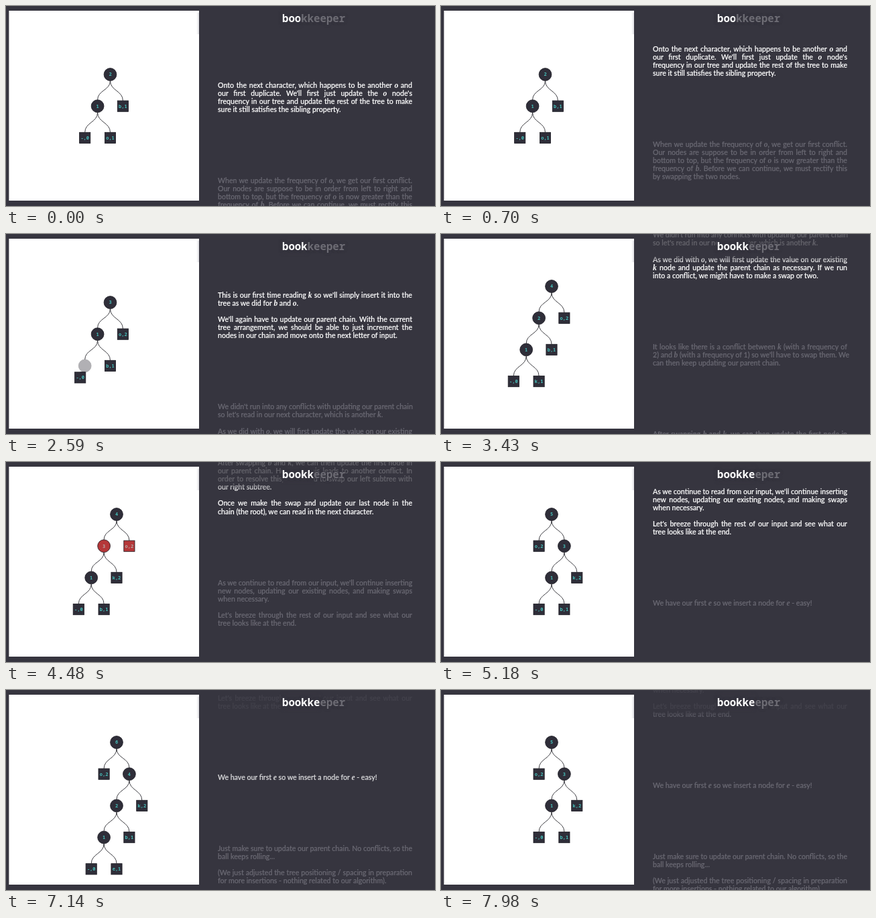
Write an HTML page that moves like this. It is 640x298 px and loops after 8 s.

```html
<!DOCTYPE html>
<html lang="en">
<head>
<meta charset="utf-8">
<title>Adaptive Huffman tree</title>
<style>
  html, body { margin: 0; width: 100%; height: 100%; overflow: hidden; background: #36353f; }
  #stage { position: relative; width: 640px; height: 298px; overflow: hidden; background: #36353f; }
  #tree { position: absolute; left: 0; top: 0; }
  #tree text { font: 700 7px "Noto Sans Mono", "DejaVu Sans Mono", monospace; text-anchor: middle; }
  #prose { position: absolute; left: 316px; top: 0; width: 290px; font: 500 10.6px/12px Lato, "Open Sans", sans-serif;
    -webkit-text-stroke: .2px currentColor; }
  .line { position: absolute; left: 0; width: 290px; height: 12px; white-space: nowrap; }
  .full { text-align: justify; text-align-last: justify; }
  .line i { font: italic 700 11.5px/0 "Liberation Serif", "Noto Serif", serif; -webkit-text-stroke: 0; }
  #veil { position: absolute; left: 292px; top: 0; width: 348px; height: 43px;
    background: linear-gradient(rgba(54,53,63,.77) 31px, rgba(54,53,63,0) 43px); }
  #title { position: absolute; left: 412px; top: 8px; font: 600 15.7px/20px "Noto Sans Mono", "DejaVu Sans Mono", monospace;
    color: #6d6c74; white-space: pre; text-shadow: 0 0 4px #36353f, 0 0 4px #36353f; }
  #title b { font-weight: 600; color: #fff; background: #36353f; box-shadow: 0 0 4px #36353f; }
</style>
</head>
<body>
<div id="stage">
  <svg id="tree" width="292" height="298" viewBox="0 0 292 298">
    <defs>
      <linearGradient id="edge"><stop offset="0" stop-color="#fff"/><stop offset="1" stop-color="#e0e0e4"/></linearGradient>
    </defs>
    <rect x="4.4" y="7" width="283.6" height="283" fill="#fff"/>
    <rect x="284" y="10" width="4" height="32" fill="url(#edge)"/>
    <g id="graph"></g>
  </svg>
  <div id="prose"></div>
  <div id="veil"></div>
  <div id="title"></div>
</div>
<script>
const LOOP = 8000;
const $ = id => document.getElementById(id);
const clamp = v => Math.max(0, Math.min(1, v));
const mix = (a, b, u) => a + (b - a) * u;
const ease = u => u < .5 ? 4 * u ** 3 : 1 - (2 - 2 * u) ** 3 / 2;
const mixColor = (a, b, u) => `rgb(${a.map((v, i) => Math.round(mix(v, b[i], u)))})`;

// Sections of paragraphs; "|" breaks lines, _x_ marks a symbol.
const sections = [
  ["Onto the next character, which happens to be another _o_ and|our first duplicate. We'll first just update the _o_ node's|frequency in our tree and update the rest of the tree to make|sure it still satisfies the sibling property."],
  ["When we update the frequency of _o_, we get our first conflict.|Our nodes are suppose to be in order from left to right and|bottom to top, but the frequency of _o_ is now greater than the|frequency of _b_. Before we can continue, we must rectify this|by swapping the two nodes."],
  ["Now that we've swapped the two nodes, our tree again|satisfies the sibling property, so we can continue updating the|rest of the tree. In this case, we simply had to update the root's|value, so we are good to go.",
   "Time for the next character..."],
  ["This is our first time reading _k_ so we'll simply insert it into the|tree as we did for _b_ and _o_.",
   "We'll again have to update our parent chain. With the current|tree arrangement, we should be able to just increment the|nodes in our chain and move onto the next letter of input."],
  ["We didn't run into any conflicts with updating our parent chain|so let's read in our next character, which is another _k_.",
   "As we did with _o_, we will first update the value on our existing|_k_ node and update the parent chain as necessary. If we run|into a conflict, we might have to make a swap or two."],
  ["It looks like there is a conflict between _k_ (with a frequency of|2) and _b_ (with a frequency of 1) so we'll have to swap them. We|can then keep updating our parent chain."],
  ["After swapping _b_ and _k_, we can then update the first node in|our parent chain. However, this leads to another conflict. In|order to resolve this, we'll need to swap our left subtree with|our right subtree.",
   "Once we make the swap and update our last node in the|chain (the root), we can read in the next character."],
  ["As we continue to read from our input, we'll continue inserting|new nodes, updating our existing nodes, and making swaps|when necessary.",
   "Let's breeze through the rest of our input and see what our|tree looks like at the end."],
  ["We have our first _e_ so we insert a node for _e_ - easy!"],
  ["Just make sure to update our parent chain. No conflicts, so the|ball keeps rolling...",
   "(We just adjusted the tree positioning / spacing in preparation|for more insertions - nothing related to our algorithm)."]
];

let y = 118;
const blocks = sections.map(paragraphs => {
  const el = document.createElement("div");
  const top = y;
  let last = y;
  for (const paragraph of paragraphs) {
    const lines = paragraph.split("|");
    lines.forEach((text, i) => {
      const full = i < lines.length - 1 ? " full" : "";
      el.innerHTML += `<div class="line${full}" style="top:${y - 6}px">${text.replace(/_(\w)_/g, "<i>$1</i>")}</div>`;
      last = y;
      y += 12.05;
    });
    y += 12.3;
  }
  y = last + 106;
  $("prose").append(el);
  return { el, top, last };
});

// Scroll position over time, joined by a monotone cubic.
const scrollKeys = [[0, 0], [840, 68], [1470, 183], [2590, 489.8], [3430, 745.5], [4480, 1042.4],
  [5300, 1195], [6020, 1256], [6200, 1259], [7250, 1259], [7910, 1250], [8000, 1246]];
const slopes = scrollKeys.slice(1).map(([t, s], i) => (s - scrollKeys[i][1]) / (t - scrollKeys[i][0]));
const tangents = scrollKeys.map((_, i) => {
  const a = slopes[i - 1] ?? slopes[0], b = slopes[i] ?? a;
  return a * b > 0 ? 2 * a * b / (a + b) : 0;
});
function scrollAt(t) {
  let i = scrollKeys.findLastIndex(k => k[0] <= t);
  i = Math.min(i, scrollKeys.length - 2);
  const [t0, s0] = scrollKeys[i], [t1, s1] = scrollKeys[i + 1];
  const h = t1 - t0, u = (t - t0) / h, v = 1 - u;
  return v * v * ((1 + 2 * u) * s0 + u * h * tangents[i]) + u * u * ((3 - 2 * u) * s1 - v * h * tangents[i + 1]);
}

// Trees in prefix order: capitals are inner nodes, "_" is not yet shown, "!" is a conflict.
const LOW = [155.5, 102], HIGH = [165, 78];
const states = [
  [0, 1, LOW, "R2 P1 -0 o1 b1"],
  [1150, 1, LOW, "R2 P1 -0 o2! b1!"],
  [1850, 400, LOW, "R2 P1 -0 b1 o2"],
  [2300, 1, LOW, "R3 P1 -0 b1 o2"],
  [2410, 400, LOW, "R3 P1 Q_ -0 k_ b1 o2"],
  [2820, 170, LOW, "R3 P1 Q_ -0 k1 b1 o2"],
  [3000, 1, LOW, "R3 P1 Q1 -0 k1 b1 o2"],
  [3060, 1, LOW, "R3 P2 Q1 -0 k1 b1 o2"],
  [3120, 290, HIGH, "R4 P2 Q1 -0 k1 b1 o2"],
  [3570, 1, HIGH, "R4 P2 Q1 -0 k2! b1! o2"],
  [3990, 350, HIGH, "R4 P2 Q1 -0 b1 k2 o2"],
  [4360, 1, HIGH, "R4 P3! Q1 -0 b1 k2 o2!"],
  [4630, 400, HIGH, "R4 o2 P3 Q1 -0 b1 k2"],
  [5130, 1, HIGH, "R5 o2 P3 Q1 -0 b1 k2"],
  [6170, 400, HIGH, "R5 o2 P3 Q1 T_ -0 e_ b1 k2"],
  [6575, 140, HIGH, "R5 o2 P3 Q1 T_ -0 e1 b1 k2"],
  [6860, 1, HIGH, "R5 o2 P3 Q1 T1 -0 e1 b1 k2"],
  [6930, 1, HIGH, "R5 o2 P4 Q2 T1 -0 e1 b1 k2"],
  [7000, 1, HIGH, "R6 o2 P4 Q2 T1 -0 e1 b1 k2"],
  [7450, 400, HIGH, "R5 o2 P3 Q1 -0 b1 k2"]
].map(([at, dur, root, text]) => ({ at, dur, nodes: layout(text, root) }));

function layout(text, [rootX, rootY]) {
  const tokens = text.split(" "), nodes = {};
  (function place(x, y, parent) {
    const [id, count, mark] = tokens.shift();
    const inner = id >= "A" && id <= "Z", hidden = count === "_";
    const label = hidden ? "" : inner ? count : id + "," + count;
    nodes[id] = { x, y, parent, inner, label, red: mark ? 1 : 0, alpha: hidden && !inner ? 0 : 1 };
    if (inner) {
      place(x - 18.9, y + 47.2, id);
      place(x + 18.9, y + 47.2, id);
    }
  })(rootX, rootY);
  return nodes;
}

function blend(a, b, u) {
  const from = a || { ...b, alpha: 0 }, to = b || { ...a, alpha: 0, parent: null };
  const node = { ...to };
  for (const key of ["x", "y", "red", "alpha"]) node[key] = mix(from[key], to[key], u);
  return node;
}

function drawNode({ x, y, inner, label, red, alpha }) {
  const fill = mixColor([47, 46, 57], [181, 55, 57], red);
  const ink = mixColor([69, 190, 185], [180, 172, 168], red);
  const look = `fill="${fill}" stroke="#1b1a21" stroke-width=".8"`;
  const shape = inner ? `<circle cx="${x}" cy="${y}" r="9.4" ${look}/>`
    : `<rect x="${x - 8.1}" y="${y - 8.1}" width="16.2" height="16.2" ${look}/>`;
  return `<g opacity="${alpha}">${shape}<text x="${x}" y="${y + 2.4}" fill="${ink}">${label}</text></g>`;
}

function drawLink(p, c) {
  const top = p.y + 9.4, bottom = c.y - (c.inner ? 9.4 : 8.1), mid = (top + bottom) / 2;
  return `<path d="M${p.x} ${top}C${p.x} ${mid} ${c.x} ${mid} ${c.x} ${bottom}" fill="none" stroke="#2b2b30" stroke-width=".9" opacity="${c.inner ? 1 : c.alpha}"/>`;
}

function drawTree(t) {
  const i = states.findLastIndex(s => s.at <= t);
  const now = states[i], before = states[Math.max(0, i - 1)];
  const u = ease(clamp((t - now.at) / now.dur));
  const nodes = {};
  for (const id of Object.keys({ ...before.nodes, ...now.nodes })) {
    nodes[id] = blend(before.nodes[id], now.nodes[id], u);
  }
  const list = Object.values(nodes);
  const links = list.filter(n => n.parent).map(n => drawLink(nodes[n.parent], n));
  $("graph").innerHTML = links.join("") + list.map(drawNode).join("");
}

function render(t) {
  const scroll = scrollAt(t);
  $("prose").style.transform = `translateY(${-scroll}px)`;
  for (const { el, top, last } of blocks) {
    const active = clamp((131.5 - top + scroll) / 2) * clamp((last - scroll - 40) / 10);
    el.style.color = mixColor([106, 105, 115], [255, 255, 255], active);
  }
  const read = 3 + [2410, 3000, 5130].filter(at => t >= at).length;
  const word = "bookkeeper";
  $("title").innerHTML = `<b>${word.slice(0, read)}</b>${word.slice(read)}`;
  drawTree(t);
}

const start = performance.now();
(function tick() {
  render((performance.now() - start) % LOOP);
  requestAnimationFrame(tick);
})();
</script>
</body>
</html>
```
